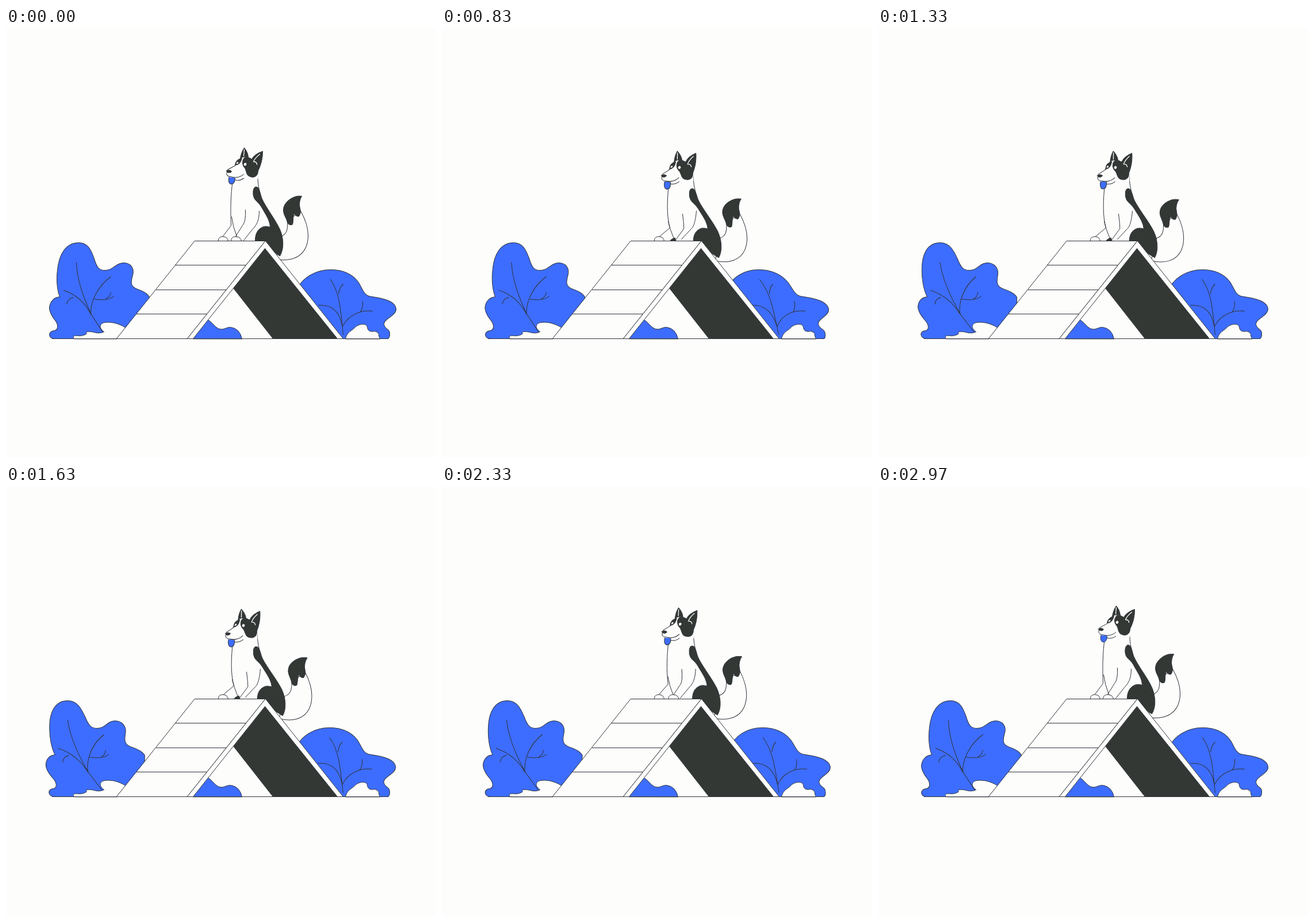
An HTML page for the animation above (3.01 s loop, 748 by 748 pixels).

```html
<!DOCTYPE html>
<html lang="en">
<head>
<meta charset="utf-8">
<title>Dog on a ramp</title>
<style>
html, body { margin: 0; height: 100%; overflow: hidden; background: #fdfdfc; }
svg { display: block; width: 100vw; height: 100vh; }
svg * { stroke-linejoin: round; stroke-linecap: round; }
.line { fill: none; }
.white { fill: #fdfdfc; }
.blue { fill: #3d6dff; }
.dark { fill: #333835; }
.bare { stroke: none; }
.light { fill: none; stroke: #fdfdfc; stroke-width: 1.3; }
</style>
</head>
<body>
<!-- Half-pixel origin puts whole coordinates on pixel centres -->
<svg viewBox="-.5 -.5 748 748" stroke="#30343a" stroke-width="1">
  <g id="leftBush">
    <path class="blue" d="M83 540C72 539 73 527 83 526C91 525 91 515 84 507C78 499 75 493 75 486C76 475 83 468 93 467C88 455 87 436 89 420C92 392 104 373 126 373C143 373 148 387 153 401C157 415 161 421 171 421C187 421 190 408 204 408C217 408 223 418 220 429C217 440 215 448 226 453C238 457 246 461 249 468L240 540Z"/>
    <path class="line" d="M122 407C123 439 136 473 148 498L168 529M100 456Q131 466 147 497M105 480Q107 470 117 468M182 432C160 448 146 474 147 498M153 471Q177 475 187 466M173 471Q181 467 182 459"/>
  </g>
  <path class="white" d="M118 540C114 535 119 534 126 535C134 535 138 533 140 531C136 527 146 527 153 529C160 531 166 530 170 528C162 522 161 515 170 512C182 510 195 513 208 521L193 540Z"/>

  <g id="rightBush">
    <path class="blue" d="M500 540L505 455C515 434 537 420 564 420C588 420 603 429 612 441C619 451 621 463 631 466C651 469 678 473 678 489C678 500 656 506 657 515C659 525 668 522 667 533Q667 538 664 540Z"/>
    <path class="line" d="M564 437C580 460 582 490 586 533M586 445Q580 450 578 462M543 482C565 480 580 492 584 517M637 492C612 489 592 503 585 519M620 475Q621 486 616 493"/>
  </g>
  <path class="white" d="M590 540C593 528 600 527 606 521C612 514 627 512 628 520C629 528 635 528 641 527Q649 529 648 535L650 540Z"/>

  <g id="body">
    <g id="tail">
      <path class="white" d="M470 402C495 406 514 398 521.500 380C529 360 524 339 512 318L489 335C490 350 488 358 478 362Z"/>
      <path class="dark" d="M514 292C498 290 481 304 482 318C483 327 488 330 489 338Q493 344 498 341C500 334 498 328 501 322Q504 328 509 327C514 320 511 315 510 308Q510 298 514 292Z"/>
    </g>
    <path class="white bare" d="M394 264C390 290 390 320 391 335L400 362L402 371L455 371L462 340L440 285L437 255Z"/>
    <path class="dark" d="M434 276C429 277 428 288 431 295C434 301 440 303 444 311C451 324 459 334 459 346C447 341 432 350 433 371L451 380L476 396C484 383 482 364 476 350C468 332 452 313 445 297C441 288 441 275 434 276Z"/>
    <path class="line" d="M437.500 254C437 266 438 275 442 289"/>
  </g>
  <path id="legs" class="line"/>
  <path id="wedge" class="dark bare" d="M396 369.500Q399 365 405 364L407 369.500Z"/>
  <path id="paw1" class="white" d="M369 370C368 364 373 362 378 362.500Q385 363 386 370Z"/>
  <path id="paw2" class="white" d="M391 370C391 364 395 362 400 362.500Q408 363 409 370Z"/>

  <g id="head">
    <path id="tongue" class="blue" d="M388 257C386 263 386 270 391 271C397 271 398 265 398 259Z"/>
    <path class="white bare" d="M408 224L399 236L384 246L384 254L388 259L399 260L412 266L438 262L440 235L426 224Z"/>
    <path class="line" d="M408 226C404 231 401 238 396 240L385 246M384 250C382 255 385 258 390 258C399 261 408 259 413 254M398 264Q406 266 413 261"/>
    <path class="dark" d="M383 248Q388 245 392 249Q389 253 384 250Z"/>
    <path class="dark" d="M407 226Q409 215 414 208Q420 215 421 224Q413 222 407 226Z"/>
    <path class="dark" d="M410 226C404 227 399 231 398 238Q407 238 410 226Z"/>
    <path class="dark" d="M416 224C408 230 411 239 415 243C418 248 417 256 424 258C432 261 438 256 438 248C443 238 446 228 446 214C437 217 430 222 427 228Q422 224 416 224Z"/>
    <path class="light" d="M414 211L413 222M441 219Q433 225 430 232Q436 232 436 237"/>
    <path class="white bare" d="M400 236Q401 231 404 233Q404 236 400 236M413 236Q416 232 418 236Q417 240 414 239Z"/>
  </g>

  <path class="blue" d="M325 540L350 507C358 510 363 521 371 523C379 525 382 520 390 520Q406 522 410 540Z"/>
  <path class="white" d="M328 370H451L315 540H192Z"/>
  <path class="line" d="M294 412H417M261 455H383M227 497H349"/>
  <path class="dark" d="M450 383L576 540H464L395 452Z"/>
  <path class="white" d="M451 370L586 540H576L450 383L325 540H315Z"/>
  <path class="line" d="M80 540H664"/>
</svg>
<script>
const LOOP = 3010, GROUND = 540;
const el = id => document.getElementById(id);
const move = (id, value) => el(id).setAttribute("transform", value);
const mix = (a, b, k) => a + (b - a) * k;
const smooth = k => { k = Math.min(1, Math.max(0, k)); return k * k * (3 - 2 * k); };

// Eased value through [time, value] pairs
function track(keys, t) {
  const i = Math.max(1, keys.findIndex(k => k[0] >= t));
  const [t0, a] = keys[i - 1], [t1, b] = keys[i];
  return mix(a, b, smooth((t - t0) / (t1 - t0)));
}

const LEFT_SWAY = [[0, 0], [430, -.012], [830, -.012], [1450, -.12], [2150, -.085], [LOOP, 0]];
const RIGHT_SWAY = [[0, 0], [650, -.135], [1400, 0], [2150, -.068], [LOOP, 0]];
const CROUCH = [[0, 0], [540, 1], [2130, 1], [2580, 0], [LOOP, 0]];

// Shear that keeps the ground line fixed
const sway = (id, k) => move(id, `matrix(1 0 ${-k} 1 ${k * GROUND} 0)`);

function legs(p) {
  const pt = (x, y, x2, y2) => `${mix(x, x2, p)} ${mix(y, y2, p)} `;
  return "M" + pt(394, 264, 394, 271) + "C" + pt(390, 290, 391, 300) + pt(390, 320, 390, 326) + pt(391, 343, 396, 347)
    + "L" + pt(376, 363, 377, 363)
    + "M" + pt(392, 328, 393, 336) + "Q" + pt(394, 345, 396, 350) + pt(401, 362, 404, 368)
    + "M" + pt(416, 316, 418, 323) + "Q" + pt(417, 336, 421, 347) + pt(411, 343, 420, 349) + "L" + pt(397, 365, 406, 368)
    + "M" + pt(440, 318, 442, 318) + "C" + pt(440, 335, 441, 332) + pt(435, 343, 438, 345) + pt(428, 350, 433, 349)
    + "L" + pt(413, 369, 416, 367);
}

function draw(t) {
  const p = track(CROUCH, t);
  const wag = (1 - Math.cos(t / LOOP * 6 * Math.PI)) / 2;
  const lifted = t > 650 && t < 1640;
  sway("leftBush", track(LEFT_SWAY, t));
  sway("rightBush", track(RIGHT_SWAY, t));
  move("body", `matrix(1 0 ${.04 * p} 1 ${-11 * p} ${3 * p})`);
  move("tail", `rotate(${3.7 * wag + 1.8 * p} 478 395)`);
  move("head", `translate(${-2.7 * p} ${5.6 * p}) rotate(${-4.4 * p} 415 240)`);
  move("tongue", `translate(0 ${p * (1.8 - .8 * wag)})`);
  el("legs").setAttribute("d", legs(p * p));
  move("paw2", `translate(${7 * p * p} 0)`);
  el("paw2").style.display = lifted ? "none" : "";
  el("wedge").style.display = lifted ? "" : "none";
}

const start = performance.now();
function frame() {
  draw((performance.now() - start) % LOOP);
  requestAnimationFrame(frame);
}
frame();
</script>
</body>
</html>
```
